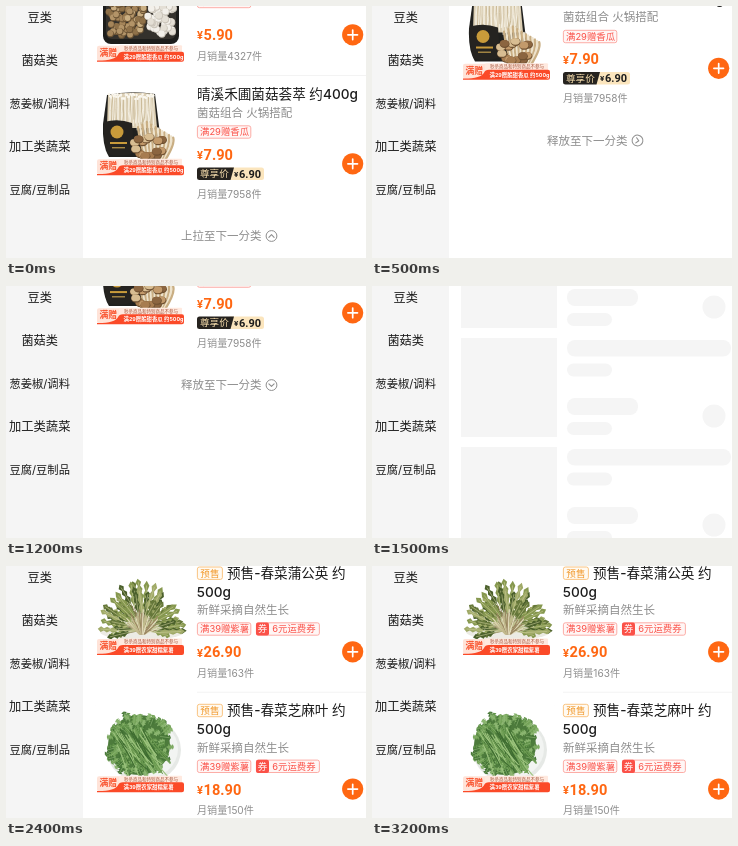
Recreate the animation shown at these times as an HTML page. Size 360 px wide and 252 px high, loop 3.3 s.

```html
<!DOCTYPE html>
<html lang="zh-CN">
<head>
<meta charset="utf-8">
<title>分类列表</title>
<style>
html, body { margin: 0; width: 100%; height: 100%; overflow: hidden; background: #fff; }
svg { display: block; width: 360px; height: 252px; }
text { font-family: Inter, "Noto Sans CJK SC", "Noto Sans CJK JP", sans-serif; white-space: pre; }
.price { font-family: Roboto, "Noto Sans", sans-serif; font-weight: 700; }
</style>
</head>
<body>
<svg id="stage" viewBox="0 0 360 252" xmlns="http://www.w3.org/2000/svg"></svg>
<script>
const NS = 'http://www.w3.org/2000/svg';
const stage = document.getElementById('stage');
const ORANGE = '#ff6712', RED = '#fb5148', INK = '#1c1c1c', GREY = '#8e8e8e', PALE = '#f5f5f5';

function add(parent, tag, attrs = {}) {
  const el = document.createElementNS(NS, tag);
  for (const k in attrs) el.setAttribute(k, attrs[k]);
  parent.appendChild(el);
  return el;
}
const group = (p, attrs) => add(p, 'g', attrs);
const rect = (p, x, y, width, height, fill, rx = 0, more = {}) =>
  add(p, 'rect', { x, y, width, height, fill, rx, ...more });
const circle = (p, cx, cy, r, fill, more = {}) => add(p, 'circle', { cx, cy, r, fill, ...more });
const ellipse = (p, cx, cy, rx, ry, fill) => add(p, 'ellipse', { cx, cy, rx, ry, fill });
const path = (p, d, fill, more = {}) => add(p, 'path', { d, fill, ...more });
const line = (p, d, stroke, width) =>
  path(p, d, 'none', { stroke, 'stroke-width': width, 'stroke-linecap': 'round', 'stroke-linejoin': 'round' });

// y is the vertical middle of the line
function label(p, s, x, y, size, fill, more = {}) {
  const t = add(p, 'text', { x, y: y + size * 0.37, 'font-size': size, fill, ...more });
  t.textContent = s;
  return t;
}

const clamp = v => Math.max(0, Math.min(1, v));

function seeded(seed) {
  return () => (seed = (seed * 16807) % 2147483647) / 2147483647;
}

// ---------- shared parts ----------
const title = (p, s, x, y) => label(p, s, x, y, 13.6, INK, { 'font-weight': 500 });
const sales = (p, n, y) => label(p, `月销量${n}件`, 191, y, 10.1, GREY);
const divider = (p, y) => rect(p, 191, y, 169, 0.8, '#f0f0f0');

function price(p, value, y) {
  label(p, '¥', 191, y + 0.8, 11, ORANGE, { class: 'price' });
  label(p, value, 197.6, y, 14.6, ORANGE, { class: 'price' });
}

function plus(p, y) {
  circle(p, 346.7, y, 10.6, ORANGE);
  line(p, `M341.9 ${y}h9.6M346.7 ${y - 4.8}v9.6`, '#fff', 1.7);
}

function outline(p, x, y, w, h, color, fill) {
  rect(p, x, y, w, h, fill, 2, { stroke: color, 'stroke-width': 0.8 });
}

function giftTag(p, s, y) {
  outline(p, 191.4, y - 6.2, 53.4, 12.4, '#fc9a92', '#fff6f5');
  label(p, s, 194, y, 9.4, RED);
}

function banner(p, s, y) {
  rect(p, 91, y - 7, 24, 15, '#ffe3d8', 2);
  rect(p, 113, y - 7.5, 63, 7, '#ffe9df', 1);
  label(p, '秒杀商品和特别商品不参与', 118, y - 4.3, 4.5, '#a8563c');
  path(p, `M91 ${y + 7.8}Q109 ${y + 8} 112 ${y + 2}Q113 ${y - 1} 117 ${y - 1}H176q2 0 2 2V${y + 7}q0 2 -2 2H91z`, '#fb4a28');
  label(p, '满赠', 93.5, y - 0.2, 8.8, '#f9512c', { 'font-weight': 700 });
  label(p, s, 117.5, y + 3.8, 5.4, '#fff', { 'font-weight': 700 });
}

// ---------- pictures ----------
function mushroomTray(p) {
  const rnd = seeded(71);
  rect(p, 97, -30, 76, 68, '#1d1d1b', 8);
  rect(p, 100, -28, 70, 61, '#34312c', 6);
  const browns = ['#8f7149', '#b39468', '#c9ae82', '#a5855a'];
  for (let i = 0; i < 90; i++) {
    const x = 103 + rnd() * 35, y = -6 + rnd() * 36;
    circle(p, x, y, 3.4, '#6b5334');
    circle(p, x - 0.4, y - 0.6, 2.9, browns[i % 4]);
  }
  for (let i = 0; i < 65; i++) {
    const x = 142 + rnd() * 26, y = -6 + rnd() * 35;
    circle(p, x, y, 3.7, '#c9c3b8');
    circle(p, x - 0.4, y - 0.5, 3.2, i % 3 ? '#f3f0ea' : '#e4dfd5');
  }
}

function mixedTray(p) {
  const rnd = seeded(29);
  path(p, 'M101 89Q125 84 149 88L154 128L148 151L103 151Q96 140 97 118z', '#20201e');
  path(p, 'M102 89Q125 85 148 88L151 122H101z', '#dccfb4');
  for (let i = 0; i < 38; i++) {
    const x = 103 + i * 1.2, top = 88 + rnd() * 5;
    line(p, `M${x} ${top}q${rnd() * 4 - 2} 14 ${rnd() * 5 - 2} ${24 + rnd() * 8}`, i % 3 ? '#f4efe2' : '#cbbb99', 1);
    circle(p, x, top, 1.2, '#fbf8f0');
  }
  path(p, 'M98 116Q112 112 126 117L128 147Q112 152 102 148Q97 135 98 116z', '#252320');
  circle(p, 111, 126, 6.5, '#c99b3a');
  rect(p, 104, 136, 17, 2, '#c99b3a');
  rect(p, 106, 141, 13, 1.4, '#a98a45');
  for (let i = 0; i < 17; i++) {
    const x = 132 + i * 2.2, y = 116 + Math.abs(i - 4) * 1.3;
    line(p, `M${x} ${y}Q${x + 2} 138 ${140 + i * 1.2} 154`, i % 2 ? '#eee3cc' : '#c9ae83', 2.3);
  }
  const caps = ['#a77c50', '#c39a6b', '#8b6540', '#d8bd92'];
  for (let i = 0; i < 16; i++) {
    const x = 128 + rnd() * 34, y = 131 + rnd() * 21;
    ellipse(p, x, y, 5, 4, '#6f5132');
    ellipse(p, x - 0.3, y - 0.6, 4.5, 3.4, caps[i % 4]);
  }
}

// jagged leaf growing from x, y
function leaf(p, x, y, angle, len, color, vein) {
  const dx = Math.cos(angle), dy = Math.sin(angle);
  let d = `M${x} ${y}`, back = '';
  for (let k = 1; k <= 7; k++) {
    const s = len * k / 7, w = k === 7 ? 0 : (k % 2 ? 1.1 : 2.9);
    d += `L${x + dx * s - dy * w} ${y + dy * s + dx * w}`;
    back = `L${x + dx * s + dy * w} ${y + dy * s - dx * w}` + back;
  }
  path(p, d + back + 'z', color);
  line(p, `M${x} ${y}L${x + dx * len * 0.85} ${y + dy * len * 0.85}`, vein, 0.6);
}

function dandelion(p) {
  const rnd = seeded(113);
  const greens = ['#66783a', '#86984f', '#4a5f2b', '#a0aa68'];
  const x0 = 136, y0 = 64;
  ellipse(p, x0, 66, 42, 8, '#ecebe4');
  for (let i = 0; i < 58; i++) {
    const a = -Math.PI * (1.06 - 1.12 * ((i * 0.618) % 1));
    const reach = 0.62 + rnd() * 0.38;
    const tx = Math.cos(a) * 45 * reach, ty = Math.sin(a) * 52 * reach;
    const from = 0.3 + rnd() * 0.25;
    line(p, `M${x0 + tx * 0.1} ${y0 + ty * 0.1}L${x0 + tx * from} ${y0 + ty * from}`, i % 3 ? '#b9bd85' : '#8c7f55', 0.9);
    leaf(p, x0 + tx * from, y0 + ty * from, Math.atan2(ty, tx) + rnd() * 0.5 - 0.25,
      Math.hypot(tx, ty) * (1 - from), greens[i % 4], '#c9cc98');
  }
  for (let i = 0; i < 26; i++) {
    const a = -Math.PI * rnd(), r = 12 + rnd() * 10;
    line(p, `M${x0 + Math.cos(a) * 3} ${y0 + 4}L${x0 + Math.cos(a) * r} ${y0 + Math.sin(a) * r}`,
      ['#e3dcbc', '#c2b98d', '#9a8560'][i % 3], 1.1);
  }
}

function sesameLeaf(p) {
  const rnd = seeded(47);
  ellipse(p, 138, 184, 37, 33, '#e6e9e6');
  ellipse(p, 138, 183, 34, 30, '#f2f4f2');
  ellipse(p, 133, 179, 31, 30, '#4d7b3c');
  const greens = ['#5f9148', '#74a358', '#467637', '#86b26b'];
  for (let i = 0; i < 120; i++) {
    const a = i * 2.399, r = Math.sqrt(rnd());
    const x = 133 + Math.cos(a) * 28 * r, y = 178 + Math.sin(a) * 27 * r;
    leaf(p, x, y, a + rnd() - 0.5, 6 + rnd() * 5, greens[i % 4], '#94bb7b');
  }
  for (let i = 0; i < 52; i++) {
    const x = 107 + rnd() * 34, y = 160 + rnd() * 20;
    line(p, `M${x} ${y}q${4 + rnd() * 6} 12 ${10 + rnd() * 14} ${20 + rnd() * 12}`,
      ['#9cc37d', '#6c9b51', '#3f6d31'][i % 3], 1.1);
  }
}

// ---------- first list ----------
const first = group(stage);
mushroomTray(first);
banner(first, '满29赠脆甜香瓜 约500g', 46.8);
giftTag(first, '满29赠香瓜', -4.5);
price(first, '5.90', 28.5);
sales(first, 4327, 50);
plus(first, 28.8);
divider(first, 69);

mixedTray(first);
banner(first, '满29赠脆甜香瓜 约500g', 160.2);
title(first, '晴溪禾圃菌菇荟萃 约400g', 191, 88);
label(first, '菌菇组合 火锅搭配', 191, 106.5, 11.5, GREY);
giftTag(first, '满29赠香瓜', 126);
price(first, '7.90', 148.5);
rect(first, 222, 161.5, 36, 12.5, '#fbe5bd', 2.5);
path(first, 'M193.5 161.5H228L224.5 174H193.5q-2.5 0 -2.5 -2.5v-7.5q0 -2.5 2.5 -2.5z', '#26231f');
label(first, '尊享价', 194, 167.5, 9.6, '#f8dfae', { 'font-weight': 500 });
label(first, '¥', 228, 168, 8, INK, { class: 'price' });
label(first, '6.90', 233, 167.7, 11, INK, { class: 'price' });
sales(first, 7958, 188);
plus(first, 157.8);

const hint = label(first, '', 175, 230, 11.5, GREY);
const arrow = group(first);
circle(arrow, 0, 0, 5.4, 'none', { stroke: GREY, 'stroke-width': 1 });
line(arrow, 'M-2.6 1.3L0 -1.3L2.6 1.3', GREY, 1.1);

// ---------- placeholder ----------
const skeleton = group(stage);
for (let y = -55; y < 252; y += 109) {
  rect(skeleton, 89, y - 2, 96, 99, PALE);
  rect(skeleton, 195, y, 164, 16.5, PALE, 8);
  rect(skeleton, 195, y + 23.5, 45, 13, PALE, 6.5);
  rect(skeleton, 195, y + 58, 71, 17, PALE, 8);
  rect(skeleton, 195, y + 82, 45, 13, PALE, 6.5);
  circle(skeleton, 342, y + 76, 11.5, PALE);
}

// ---------- second list ----------
const second = group(stage);
const GAP = 137.3;
for (const y of [-2, -2 + GAP]) rect(second, 90, y, 92, 92, PALE, 4);
const pictures = group(second);
rect(pictures, 90, -3, 92, 240, '#fff');
dandelion(pictures);
sesameLeaf(pictures);

function presale(name, sum, sold, dy) {
  const g = group(second, { transform: `translate(0 ${dy})` });
  outline(g, 191.4, 1, 25, 12.4, '#f8b765', '#fffaf2');
  label(g, '预售', 194.3, 7.2, 9.6, '#f29a2e');
  title(g, `预售-${name} 约`, 221, 7);
  title(g, '500g', 190.7, 26);
  label(g, '新鲜采摘自然生长', 191, 44, 11.5, GREY);
  giftTag(g, '满39赠紫薯', 63);
  outline(g, 250.4, 56.8, 63, 12.4, '#fc9a92', '#fff6f5');
  rect(g, 250, 56.4, 13, 13.2, RED, 2);
  label(g, '券', 251.8, 63, 9.4, '#fff');
  label(g, '6元运费券', 266.2, 63, 9.4, RED);
  price(g, sum, 86);
  sales(g, sold, 107.3);
  plus(g, 85.8);
  banner(g, '满39赠农家甜糯紫薯', 80);
}
presale('春菜蒲公英', '26.90', 163, 0);
presale('春菜芝麻叶', '18.90', 150, GAP);
divider(second, 125.8);

// ---------- sidebar ----------
rect(stage, 0, 0, 77, 252, PALE);
[['豆类', 12.2], ['菌菇类', 12.2], ['葱姜椒/调料', 11.3], ['加工类蔬菜', 12.3], ['豆腐/豆制品', 11.3]]
  .forEach(([s, size], i) => label(stage, s, 33.7, 11.8 + i * 43, size, INK, { 'text-anchor': 'middle' }));

// ---------- motion, in steps of 100 ms ----------
const LOOP = 3300, STEP = 100;
const RELEASE = 12, LOADING = 15, LOADED = 18, PULL = 131;

// the pull eases out against the end of the list, then springs back
function pulled(n) {
  return n <= RELEASE
    ? PULL * (1 - Math.exp(-0.0522 * n * n))
    : PULL * Math.exp(-0.452 * (n - RELEASE));
}

const show = (el, on) => el.setAttribute('display', on ? 'inline' : 'none');

function draw(n) {
  show(first, n < LOADING);
  show(skeleton, n >= LOADING && n < LOADED);
  show(second, n >= LOADED);
  first.setAttribute('transform', `translate(0 ${-pulled(n)})`);
  hint.textContent = n < 4 ? '上拉至下一分类' : '释放至下一分类';
  arrow.setAttribute('transform', `translate(265.5 230) rotate(${180 * clamp((n - 3.9) / 2)})`);
  pictures.setAttribute('opacity', clamp((n - LOADED) / 4));
}

const start = performance.now();
function tick() {
  draw(Math.floor(((performance.now() - start) % LOOP) / STEP));
  requestAnimationFrame(tick);
}
tick();
</script>
</body>
</html>
```
